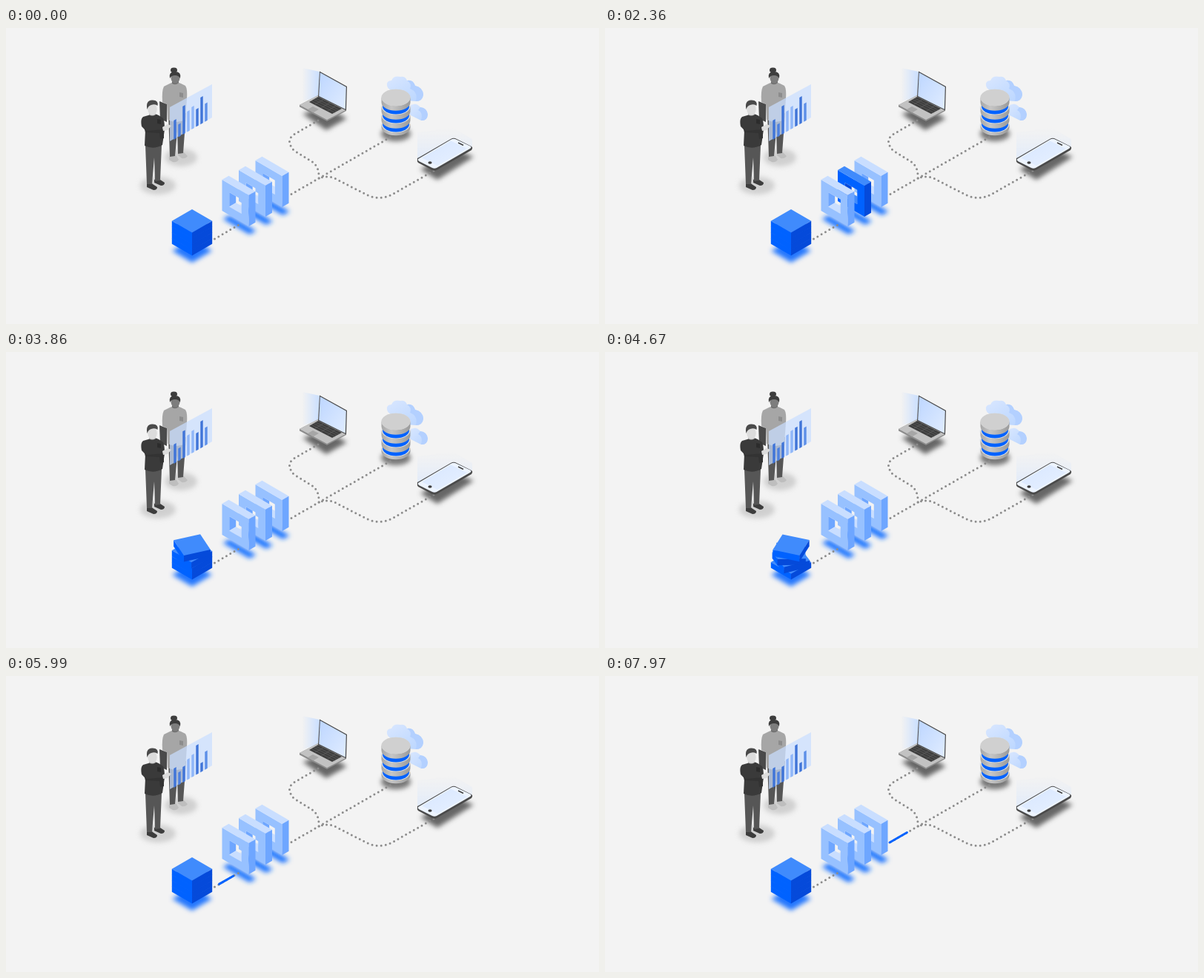
Recreate the animation shown at these times as an HTML page. Size 800 by 400 pixels, loop 8000 ms.

```html
<!DOCTYPE html>
<html lang="en">
<head>
<meta charset="utf-8">
<title>Isometric data flow</title>
<style>
html, body { margin: 0; height: 100%; overflow: hidden; background: #f3f3f3; }
svg { display: block; width: 800px; height: 400px; }
.dots path { fill: none; stroke: #8c8c8c; stroke-width: 3; stroke-linecap: round; stroke-dasharray: 0 6.15; }
.dash { fill: none; stroke: #0062ff; stroke-width: 3; stroke-linecap: round; }
.ring { --front: #97c1ff; --top: #c9deff; --side: #6ea6ff; }
.ring.on { --front: #0062ff; --top: #408bfc; --side: #054ada; }
.front { fill: var(--front); fill-rule: evenodd; }
.top { fill: var(--top); }
.side { fill: var(--side); }
</style>
</head>
<body>
<svg viewBox="0 0 800 400">
  <defs>
    <filter id="blur" x="-50%" y="-50%" width="200%" height="200%"><feGaussianBlur stdDeviation="3"/></filter>
    <linearGradient id="glowLeft"><stop stop-color="#c9deff" stop-opacity="0"/><stop offset="1" stop-color="#c9deff"/></linearGradient>
    <linearGradient id="glowUp" x2="0" y2="1"><stop stop-color="#dbe8fc" stop-opacity="0"/><stop offset="1" stop-color="#d3e4ff"/></linearGradient>
    <linearGradient id="screen" x2="1" y2="1"><stop stop-color="#bdd6ff"/><stop offset="1" stop-color="#e0ecff"/></linearGradient>
    <linearGradient id="metal"><stop stop-color="#a6a6a6"/><stop offset=".35" stop-color="#c6c6c6"/><stop offset="1" stop-color="#9a9a9a"/></linearGradient>
    <linearGradient id="cloud" x2="1" y2="1"><stop stop-color="#d9e7ff"/><stop offset="1" stop-color="#b9d5ff"/></linearGradient>
  </defs>

  <g filter="url(#blur)">
    <ellipse cx="205" cy="213" rx="24" ry="12" fill="#d0d0d0"/>
    <ellipse cx="236" cy="175" rx="22" ry="12" fill="#d0d0d0"/>
    <path d="M400 116L430 106 460 122 432 138Z" fill="#666"/>
    <ellipse cx="526" cy="143" rx="20" ry="10" fill="#777"/>
    <path d="M559 191L606 164 631 174 582 205Z" fill="#666"/>
    <path d="M224 301L251 285 278 301 251 317Z" fill="#0062ff" opacity=".85"/>
    <g id="shade" fill="#1f74ff"></g>
  </g>

  <g class="dots">
    <path d="M281.500 285L314 266"/>
    <path d="M385 224.500L523 145"/>
    <path d="M421 125L389 143.500Q376 152 389 166L412 180Q423 187 422 203"/>
    <path d="M577 193L520 225.500Q504 233 488 226L447 205Q435 198 422 203"/>
  </g>
  <path class="dash" id="arrive" d="M577 193L520 225.500Q504 233 488 226L447 205Q435 198 422 203L384 225"/>
  <path class="dash" id="leave" d="M384 225L522 145.500"/>
  <path class="dash" id="link" d="M281 285L320 262.500"/>
  <g id="rings"></g>
  <g id="cube"></g>

  <!-- person behind the panel -->
  <g>
    <path d="M220 174q5-4 10-1l3 5q-3 4-8 3l-5-3zM232 168q5-3 8 0l5 5q-3 4-8 3l-5-4z" fill="#bebebe"/>
    <path d="M219 115H243L239 169 232 170 231 140 228 173 221 174Z" fill="#565656"/>
    <path d="M221 75Q228 71 236 75L242 78Q245 82 244 96L242 124Q230 130 218 124L217 103 211 100Q210 85 213 79Z" fill="#a6a6a6"/>
    <path d="M234 87l5 1v6l-5-1z" fill="#8c8c8c"/>
    <path d="M224 66h9v8q-4 4-9 1z" fill="#6f6f6f"/>
    <ellipse cx="228.500" cy="67.500" rx="6" ry="7.500" fill="#7d7d7d"/>
    <path d="M221 68Q219 59 228 59 237 59 235 68 233 64 228 64 223 64 221 68Z" fill="#3d3d3d"/>
    <ellipse cx="226.500" cy="57" rx="4.500" ry="3.400" fill="#3d3d3d"/>
    <path d="M207 99L217 103V127L208 123Z" fill="#4a4a4a"/>
  </g>

  <path d="M221 107L278 76V121L221 153Z" fill="#c9deff" opacity=".72"/>
  <g id="bars"></g>

  <!-- person in front -->
  <g>
    <path d="M190 211q5-4 8 0l6 4q0 4-5 4l-9-4zM200 205q5-3 8 0l6 4q0 4-5 4l-9-4z" fill="#3d3d3d"/>
    <path d="M188 158H210L208 206 201 207 200 175 197 211 190 211Z" fill="#565656"/>
    <path d="M192 118Q199 114 206 118L212 122Q214 126 214 137L211 158Q199 165 187 159L188 138 183 133Q181 123 185 120Z" fill="#3a3a3a"/>
    <path d="M184 126Q185 138 191 139L213 137V149L208 150 207 142 188 141Z" fill="#333"/>
    <path d="M204 123l5 1v6l-5-1z" fill="#2c2c2c"/>
    <path d="M211 134L218 130 223 132 218 138 212 139Z" fill="#dcdcdc"/>
    <path d="M193 110h9v7q-5 3-9 0z" fill="#c6c6c6"/>
    <ellipse cx="197.500" cy="109.500" rx="6.300" ry="8" fill="#dcdcdc"/>
    <path d="M190.500 110Q188 98 197 97.500 206 97 204.500 105 201 102 196 104 192 105 190.500 110Z" fill="#4a4a4a"/>
  </g>

  <!-- laptop -->
  <path d="M400 54L423 59 421 93 400 99Z" fill="url(#glowLeft)"/>
  <path d="M396 104L421 91 459 110V112L433 126 396 106.500Z" fill="#8c8c8c"/>
  <path d="M396 104L421 91 459 110.500 433 124Z" fill="#c2c2c2"/>
  <path d="M409 100L421 93 453 109 440 116Z" fill="#3d3d3d"/>
  <path d="M412 98.500L444 114.500M415 96.500L447 112.500M418 95L450 111M417 103L428 97M425 108L437 101M433 112.500L445 105" stroke="#6f6f6f" stroke-width=".5"/>
  <path d="M407 110L414 106 422 110 415 114Z" fill="#a6a6a6"/>
  <path d="M423 58.500L460 79 459 111.500 421 93Z" fill="#4a4a4a"/>
  <path d="M423.800 60.200L458.800 79.800 457.800 109.800 422.200 92Z" fill="url(#screen)"/>

  <!-- cloud storage -->
  <path d="M514 78Q513 71 520 71 523 64 532 66 539 65 541 71 549 69 552 78 562 80 563 90 562 99 553 99L540 98 526 86Q515 84 514 78Z" fill="url(#cloud)"/>
  <path d="M541 71Q549 69 552 78 562 80 563 90 562 99 553 99 556 86 545 82 548 75 541 71Z" fill="#b3d0ff"/>
  <path d="M544 106Q552 99 559 107 568 108 569 117 568 126 560 125L544 117Z" fill="url(#cloud)"/>
  <path d="M559 107Q568 108 569 117 568 126 560 125 563 114 556 111Z" fill="#b3d0ff"/>
  <g id="disks"></g>

  <!-- phone -->
  <path d="M555 141L603 135 629 150V161L603 149 555 177Z" fill="url(#glowUp)" opacity=".55"/>
  <path d="M555 178Q554 176 557 175L600 150Q603 148 606 149L627 159.500Q630 161 629 163L628 165 581 192Q578 193.500 575 192L556 182Q554 180 555 178Z" fill="#4a4a4a"/>
  <path d="M556 177L600 151Q603 149 606 150L626 159.500Q629 161 626 163L581 189Q578 190.500 575 189L557 180Q555 178.500 556 177Z" fill="#edf4ff"/>
  <path d="M561 175.500L600 152.500 622 163 582 186Z" fill="url(#screen)" opacity=".45"/>
  <ellipse cx="572" cy="182" rx="2.600" ry="1.700" fill="#3d3d3d"/>
  <path d="M610 155L617 158.500" stroke="#3d3d3d" stroke-width="1.500"/>
</svg>
<script>
const $ = id => document.getElementById(id);
const clamp = x => Math.min(1, Math.max(0, x));
const sine = x => (1 - Math.cos(Math.PI * clamp(x))) / 2;
const STEP = 30;

// Rings, back to front
const ringX = [336.5, 314, 291.5], ringY = [179, 192, 205];
$('rings').innerHTML = ringX.map((x, i) => `<g class="ring" transform="translate(${x} ${ringY[i]})">
  <path class="side" d="M9.700 17L18.700 22.200V31.200L9.700 36.400Z"/>
  <path class="top" d="M9.700 36.400L18.700 31.200 26.300 35.600V46.100Z"/>
  <path class="front" d="M0 0L36 21V63L0 42ZM9.700 17V36.400L26.300 46.100V26.700Z"/>
  <path class="top" d="M0 0L9-5.200 45 15.800 36 21Z"/>
  <path class="side" d="M36 21L45 15.800V57.800L36 63Z"/></g>`).join('');
$('shade').innerHTML = ringX.map((x, i) =>
  `<path d="M${x + 1} ${ringY[i] + 53}l36 21 9-5-36-21z"/>`).join('');
const rings = [...document.querySelectorAll('.ring')];
const lit = [[1760, 7340], [2360, 6770], [2960, 6200]];

// Storage cylinder, bottom disk first: a metal slab with a blue core above it
const disk = (y, h, rx, fill) => `<path d="M${526 - rx} ${y}v${h}a${rx} ${rx * .58} 0 0 0 ${2 * rx} 0v${-h}z" fill="${fill}"/>`;
const lid = (y, fill) => `<ellipse cx="526" cy="${y}" rx="19.500" ry="11.300" fill="${fill}"/>`;
$('disks').innerHTML = [130, 118, 106, 94].map(y =>
  disk(y, y < 130 ? 6.5 : 4, 19.5, 'url(#metal)') + lid(y, '#dcdcdc') +
  (y > 94 ? disk(y - 5, 5, 18, '#0062ff') : '')).join('') + lid(94, '#d0d0d0');

// Cube cut into four layers that twist a quarter turn, top layer leading
const pulses = [3860, 4520, 5210];
const LAYER = 7.75;
function drawCube(t) {
  const start = pulses.findLast(p => t >= p);
  const frame = (t - start) / STEP;
  const lead = start === undefined ? 0 : 24 + 5.4 * frame + .56 * frame ** 2;
  let out = '';
  for (let i = 3; i >= 0; i--) {
    const turn = Math.PI / 2 * (clamp((lead - 22 * i) / 90) % 1);
    const y = 260.7 + i * LAYER;
    const pts = [0, 1, 2, 3].map(k => {
      const a = turn + k * Math.PI / 2;
      return [251 + 27.2 * Math.cos(a), y + 15.7 * Math.sin(a)];
    });
    const face = (d, c) => out += `<path d="${d}" fill="${c}"/>`;
    const depth = LAYER + (i < 3 ? .6 : 0);
    face(`M${pts.join('L')}Z`, '#408bfc');
    for (let k = 0; k < 4; k++) {
      const mid = (turn + (k + .5) * Math.PI / 2) % (2 * Math.PI);
      if (mid >= Math.PI) continue;
      const a = pts[k], b = pts[(k + 1) % 4];
      face(`M${a}L${b}v${depth}L${a[0]} ${a[1] + depth}Z`, mid < Math.PI / 2 ? '#054ada' : '#0062ff');
    }
  }
  $('cube').innerHTML = out;
}

// Chart: x, top, colour, then the pulse that changes it and its new top
const bars = [
  [228, 124, '#3f74d8'], [234, 129.5, '#4d80df'], [240, 105, '#3f74d8', 0, 122],
  [246, 112, '#8fb6f8'], [252, 106, '#8fb6f8'], [258, 109, '#3f74d8', 1, 93],
  [264, 93, '#3f74d8', 2, 117], [270, 101.5, '#5c8fe8']
];
function drawBars(t) {
  $('bars').innerHTML = bars.map(([x, top, fill, pulse, next]) => {
    if (next) top += (next - top) * clamp((t - pulses[pulse] + STEP) / 390);
    const base = 150 - .577 * (x - 228);
    return `<path d="M${x - 1.7} ${top + .9}l3.400-1.800V${base - .9}l-3.400 1.800z" fill="${fill}"/>`;
  }).join('');
}

const length = {};
for (const id of ['arrive', 'leave', 'link']) length[id] = $(id).getTotalLength();
function dash(id, head, tail) {
  const el = $(id), len = (head - tail) * length[id];
  el.style.display = len > .7 ? '' : 'none';
  el.style.strokeDasharray = `${Math.max(len, .1)} 9999`;
  el.style.strokeDashoffset = -tail * length[id];
}

function draw(now) {
  const t = 20 + STEP * Math.floor((now % 8000 - 20) / STEP);
  rings.forEach((r, i) => r.classList.toggle('on', lit[i].some(s => t >= s && t < s + 270)));
  dash('arrive', sine((t - 455) / 1080), sine((t - 525) / 1080));
  dash('leave', 27 / length.leave * clamp((t - 7670) / 300) ** 2, 0);
  // The inbound trip is the outbound one run backwards
  const u = t < 4500 ? 9400 - t : t;
  dash('link', sine((u - 5785) / 340), sine((u - 5895) / 350));
  drawCube(t);
  drawBars(t);
}

function loop() {
  draw(performance.now());
  requestAnimationFrame(loop);
}
loop();
</script>
</body>
</html>
```
